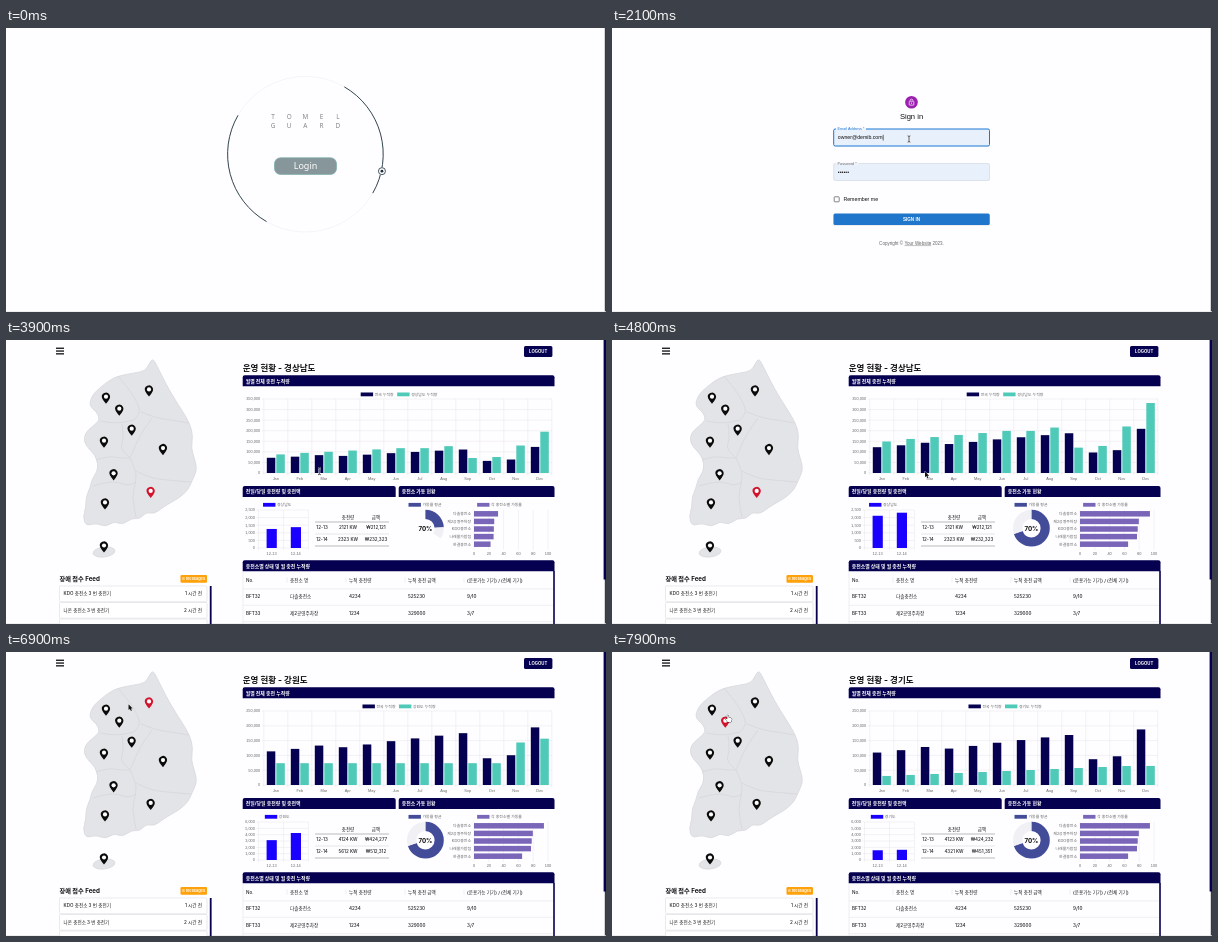
These frames come from a looping animation (600x284 px, 8000 ms). An HTML page with a canvas:

```html
<!DOCTYPE html>
<html lang="ko">
<head>
<meta charset="utf-8">
<title>Charging dashboard</title>
<style>
html, body { margin: 0; width: 100%; height: 100%; overflow: hidden; background: #fefdff; }
canvas { display: block; width: 600px; height: 284px; }
</style>
</head>
<body>
<canvas id="stage"></canvas>
<script>
const W = 600, H = 284, LOOP = 8000, STEP = 100;
const NAVY = '#05004f', TEAL = '#4fc9b8', BLUE = '#1a00ff', INDIGO = '#434c99', VIOLET = '#7a66b9';
const GREY = '#666', INK = '#222', GRID = '#e6e5e9';
const SANS = 'Inter, "Noto Sans CJK KR", "Noto Sans CJK", sans-serif';
const ARIAL = '"Liberation Sans", Arial, "Noto Sans CJK KR", "Noto Sans CJK", sans-serif';

const canvas = document.getElementById('stage');
const ctx = canvas.getContext('2d');
const dpr = window.devicePixelRatio || 1;
canvas.width = W * dpr;
canvas.height = H * dpr;

const clamp = v => Math.max(0, Math.min(1, v));
const lerp = (a, b, p) => a + (b - a) * p;
const easeOut = (t, start) => 1 - Math.pow(1 - clamp((t - start) / 1000), 4);

function rect(x, y, w, h, fill) {
  ctx.fillStyle = fill;
  ctx.fillRect(x, y, w, h);
}

function box(x, y, w, h, r, fill, stroke, width = 1) {
  ctx.beginPath();
  ctx.roundRect(x, y, w, h, r);
  if (fill) { ctx.fillStyle = fill; ctx.fill(); }
  if (stroke) { ctx.strokeStyle = stroke; ctx.lineWidth = width; ctx.stroke(); }
}

function line(x1, y1, x2, y2, color, width = 0.5) {
  ctx.beginPath();
  ctx.moveTo(x1, y1);
  ctx.lineTo(x2, y2);
  ctx.strokeStyle = color;
  ctx.lineWidth = width;
  ctx.stroke();
}

function arc(x, y, r, from, to, color, width) {
  ctx.beginPath();
  ctx.arc(x, y, r, from, to);
  ctx.strokeStyle = color;
  ctx.lineWidth = width;
  ctx.stroke();
}

function disc(x, y, r, fill) {
  ctx.beginPath();
  ctx.arc(x, y, r, 0, Math.PI * 2);
  ctx.fillStyle = fill;
  ctx.fill();
}

function text(s, x, y, size, { color = INK, align = 'left', weight = 500, font = SANS } = {}) {
  ctx.font = `${weight} ${size}px ${font}`;
  ctx.textAlign = align;
  ctx.fillStyle = color;
  ctx.fillText(s, x, y);
}

const label = (s, x, y, align = 'center') =>
  text(s, x, y, 3.9, { color: GREY, align, weight: 400, font: ARIAL });

// ---- Login ----
function drawLogin(t) {
  const cx = 299.4, cy = 126.2, r = 77.8;
  const turn = Math.max(0, t - 100) / 10000 * Math.PI * 2;
  arc(cx, cy, r, 0, Math.PI * 2, '#f4f2f6', 0.8);
  for (const base of [-Math.PI / 3, Math.PI * 2 / 3]) {
    arc(cx, cy, r, base - turn, base - turn + Math.PI / 2, '#34474f', 1);
  }
  const a = 0.218 + turn;
  const dx = cx + Math.cos(a) * 78.4, dy = cy + Math.sin(a) * 78.4;
  disc(dx, dy, 3.9, '#fefdff');
  arc(dx, dy, 3.5, 0, Math.PI * 2, '#34474f', 0.9);
  disc(dx, dy, 1.4, '#1d2d3a');

  ['TOMEL', 'GUARD'].forEach((word, row) => [...word].forEach((ch, i) =>
    text(ch, 267 + i * 16.2, 91 + row * 9.4, 6.4, { color: '#858585', align: 'center', weight: 400, font: '"Noto Sans", sans-serif' })));
  box(268.5, 129.8, 62, 16.6, 6, '#87969a', '#7fb0b0', 0.8);
  text('Login', 299.5, 141.2, 9, { color: '#fff', align: 'center', font: '"Noto Sans", sans-serif' });
}

// ---- Sign in ----
function field(y, name, focused) {
  box(221.7, y, 155.8, 17, 1.5, '#e8f0fc', focused ? '#1976d2' : '#cfd5de', focused ? 1 : 0.6);
  ctx.font = `3.8px ${ARIAL}`;
  rect(224, y - 1, ctx.measureText(name).width + 3, 2, '#f5f7fe');
  text(name, 225.5, y + 1, 3.8, { color: focused ? '#1976d2' : GREY, weight: 400, font: ARIAL });
}

function drawSignIn(t) {
  const focused = t < 3300, plain = { color: '#111', weight: 400, font: ARIAL };
  disc(299.5, 74.2, 6.3, '#9c1fb0');
  box(297.2, 73.2, 4.6, 3.9, 0.5, null, '#fff', 0.7);
  arc(299.5, 72.6, 1.4, Math.PI, 0, '#fff', 0.7);
  disc(299.5, 75.1, 0.6, '#fff');
  text('Sign in', 299.5, 90.8, 7.6, { ...plain, align: 'center' });

  field(101, 'Email Address *', focused);
  text('owner@demib.com', 225.8, 111.4, 5.2, plain);
  if (focused && t % 1000 < 500) line(271.2, 106.8, 271.2, 112.6, '#111', 0.6);
  field(135.5, 'Password *', false);
  text('••••••', 225.8, 145.9, 5.4, plain);

  box(222.2, 168.8, 5, 5, 0.6, null, '#666', 0.8);
  text('Remember me', 231.4, 173.2, 5.25, plain);

  box(221.5, 186.2, 156.2, 11.4, 1.5, 'rgba(0,0,0,.14)');
  box(221.5, 185.5, 156.2, 11.5, 1.5, t >= 2700 ? '#1565c0' : '#2076cb');
  if (t >= 3300) {
    ctx.save();
    ctx.beginPath();
    ctx.rect(221.5, 185.5, 156.2, 11.5);
    ctx.clip();
    disc(306, 191, lerp(10, 100, easeOut(t, 3250)), `rgba(255,255,255,${0.3 * (1 - clamp((t - 3300) / 500))})`);
    ctx.restore();
  }
  text('SIGN IN', 299.5, 193, 4.6, { color: '#fff', align: 'center', weight: 700, font: ARIAL });

  const parts = ['Copyright © ', 'Your Website', ' 2023.'];
  ctx.font = `4.55px ${ARIAL}`;
  const widths = parts.map(p => ctx.measureText(p).width);
  let x = 299.5 - widths.reduce((a, b) => a + b) / 2;
  parts.forEach((p, i) => {
    text(p, x, 216.8, 4.55, { ...plain, color: GREY });
    if (i === 1) line(x, 217.6, x + widths[i], 217.6, GREY, 0.4);
    x += widths[i];
  });
}

// ---- Dashboard data ----
const MONTHS = 'Jan Feb Mar Apr May Jun Jul Aug Sep Oct Nov Dec'.split(' ');
const NATION = [122, 131, 143, 137, 147, 159, 169, 179, 188, 97, 108, 209];
const REGIONS = [
  { name: '경상남도', start: 3700, pin: 8, max: 350, dayMax: 2500, dayStep: 500,
    local: [149, 161, 170, 180, 189, 199, 199, 215, 120, 128, 220, 331],
    days: [['2121 KW', '₩212,121'], ['2323 KW', '₩232,323']] },
  { name: '강원도', start: 6600, pin: 2, max: 250, dayMax: 6000, dayStep: 1000,
    local: MONTHS.map((m, i) => i < 10 ? 97 : 189 + (i - 10) * 17),
    days: [['4124 KW', '₩424,277'], ['5612 KW', '₩512,312']] },
  { name: '서울시', start: 7200, pin: 0, max: 300, dayMax: 6000, dayStep: 1000,
    local: MONTHS.map((m, i) => 120 + 13 * i),
    days: [['4312 KW', '₩431,212'], ['5123 KW', '₩502,123']] },
  { name: '경기도', start: 7790, pin: 1, max: 250, dayMax: 6000, dayStep: 1000,
    local: MONTHS.map((m, i) => Math.min(82 + 9 * i, 173)),
    days: [['4123 KW', '₩424,232'], ['4321 KW', '₩451,351']] }
];
const STATIONS = [['다솔충전소', 94.5], ['제2공영주차장', 79.5], ['KDO충전소', 78], ['나래몰가람점', 77], ['한결충전소', 65]];

// ---- Map ----
const COAST = [147,18, 152,28, 160,44, 168,58, 177,72, 184,84, 187,96, 185,108, 189,120, 191,130, 186,141, 182,150, 173,158,
  164,163, 156,168, 148,174, 140,172, 134,179, 126,178, 116,185, 108,181, 100,187, 90,183, 80,186, 77,177, 80,167, 80,157,
  84,148, 86,139, 91,132, 92,124, 89,115, 83,109, 78,102, 79,93, 87,86, 94,80, 91,72, 83,66, 86,55, 96,46, 104,40,
  112,36, 128,33, 139,31, 143,24];
const BORDERS = [
  [112,36, 122,48, 130,60, 135,72, 128,80],
  [135,72, 150,78, 165,80, 183,83],
  [94,81, 110,84, 128,80],
  [116,84, 118,98, 114,108, 124,118],
  [146,78, 136,92, 130,104, 124,118],
  [90,120, 102,116, 114,118, 124,118],
  [87,146, 106,140, 122,146, 130,142],
  [124,118, 130,130, 130,142, 126,156, 130,177],
  [130,131, 144,138, 160,140, 185,142]
];
const PINS = [[100,58], [113.3,70], [143,50.7], [98,102], [125.7,90], [157,109.4], [107.6,134.6], [99,163.7], [144.7,152.2], [98,206.8]];

function curve(pts, closed) {
  const n = pts.length / 2, at = i => [pts[i % n * 2], pts[i % n * 2 + 1]];
  const mid = (a, b) => [(a[0] + b[0]) / 2, (a[1] + b[1]) / 2];
  ctx.beginPath();
  ctx.moveTo(...(closed ? mid(at(n - 1), at(0)) : at(0)));
  for (let i = closed ? 0 : 1; i < (closed ? n : n - 1); i++) ctx.quadraticCurveTo(...at(i), ...mid(at(i), at(i + 1)));
  if (closed) ctx.closePath(); else ctx.lineTo(...at(n - 1));
}

function pin(x, y, color) {
  ctx.beginPath();
  ctx.arc(x, y - 1.3, 4.1, Math.PI * 0.86, Math.PI * 0.14);
  ctx.quadraticCurveTo(x + 2.6, y + 2.8, x, y + 5.8);
  ctx.quadraticCurveTo(x - 2.6, y + 2.8, x - 3.8, y + 0.5);
  ctx.fillStyle = color;
  ctx.fill();
  disc(x, y - 1.3, 2.1, '#fff');
}

function drawMap(selected) {
  ctx.lineWidth = 0.7;
  ctx.strokeStyle = '#d4d5da';
  ctx.fillStyle = '#e3e4e8';
  curve(COAST, true);
  ctx.fill();
  ctx.stroke();
  for (const b of BORDERS) { curve(b, false); ctx.stroke(); }
  ctx.beginPath();
  ctx.ellipse(98, 212, 11, 5, -0.12, 0, Math.PI * 2);
  ctx.fill();
  ctx.stroke();
  PINS.forEach(([x, y], i) => pin(x, y, i === selected ? '#d3122c' : '#0a0a0a'));
}

// ---- Dashboard panels ----
function header(x, y, w, s) {
  box(x, y, w, 11, [2, 2, 0, 0], NAVY);
  text(s, x + 3, y + 7.4, 4.9, { color: '#fff', weight: 700 });
}

function legend(cx, y, items) {
  const gap = 3.5;
  ctx.font = `400 3.9px ${ARIAL}`;
  const widths = items.map(([s]) => 14 + ctx.measureText(s).width);
  let x = cx - (widths.reduce((a, b) => a + b) + (items.length - 1) * gap) / 2;
  items.forEach(([s, color], i) => {
    rect(x, y - 1.9, 12.4, 3.8, color);
    label(s, x + 14, y + 1.4, 'left');
    x += widths[i] + gap;
  });
}

function yAxis(x1, x2, top, bottom, max, step) {
  for (let v = 0; v <= max; v += step) {
    const y = lerp(bottom, top, v / max);
    line(x1 - 2, y, x2, y, GRID);
    label(v.toLocaleString('en-US'), x1 - 3.6, y + 1.4, 'right');
  }
}

// Shared series keeps its height between regions, so each change starts from the last one.
function nationHeight(k, i, t) {
  if (k < 0) return 0;
  const r = REGIONS[k];
  return lerp(nationHeight(k - 1, i, r.start), NATION[i] / r.max * 74, easeOut(t, r.start));
}

function drawMonthly(k, t) {
  const r = REGIONS[k], p = easeOut(t, r.start), x0 = 257.8, gap = 24;
  legend(393, 54.4, [['전국 누적량', NAVY], [r.name + ' 누적량', TEAL]]);
  yAxis(x0, 546, 59, 133, r.max * 1000, 50000);
  for (let i = 0; i <= 12; i++) line(x0 + i * gap, 59, x0 + i * gap, 135, GRID);
  MONTHS.forEach((m, i) => {
    const cx = x0 + (i + 0.5) * gap;
    const a = nationHeight(k, i, t), b = r.local[i] / r.max * 74 * p;
    rect(cx - 9, 133 - a, 8.5, a, NAVY);
    rect(cx + 0.5, 133 - b, 8.5, b, TEAL);
    label(m, cx, 140.4);
  });
}

function drawDaily(k, t) {
  const r = REGIONS[k], p = easeOut(t, r.start);
  legend(271.2, 164.8, [[r.name, BLUE]]);
  yAxis(252.5, 302, 170, 208, r.dayMax, r.dayStep);
  for (let i = 0; i < 3; i++) line(252.5 + i * 25, 170, 252.5 + i * 25, 210, GRID);
  const mid = { align: 'center' };
  text('충전량', 342, 178.8, 4.5, mid);
  text('금액', 370, 178.8, 4.5, mid);
  line(309, 182, 383, 182, '#777');
  r.days.forEach(([power, cost], i) => {
    const day = '12-1' + (3 + i), h = parseInt(power) / r.dayMax * 38 * p, y = 189.4 + i * 11.3;
    rect(260.6 + i * 24.2, 208 - h, 10.2, h, BLUE);
    label(day, 265.6 + i * 24.2, 214.8);
    text(day, 316, y, 4.5, mid);
    text(power, 342, y, 4.5, mid);
    text(cost, 370, y, 4.5, mid);
    line(309, 194 + i * 12, 383, 194 + i * 12, i ? '#777' : '#ccc');
  });
}

function drawUptime(t) {
  const p = easeOut(t, 3800), top = -Math.PI / 2, full = Math.PI * 2 * p;
  legend(419, 164.8, [['가동률 평균', INDIGO]]);
  arc(419.4, 188.2, 13.8, top, top + full * 0.7, INDIGO, 9.2);
  arc(419.4, 188.2, 13.8, top + full * 0.7, top + full, '#f0f0f5', 9.2);
  text('70%', 419.4, 190.5, 6.2, { align: 'center', weight: 700, color: '#111' });

  legend(493.5, 164.8, [['각 충전소별 가동률', VIOLET]]);
  for (let v = 0; v <= 100; v += 20) {
    const x = 468 + v * 0.74;
    line(x, 170, x, 210, GRID);
    label(v, x, 214.6);
  }
  STATIONS.forEach(([name, value], i) => {
    const y = 173.8 + i * 7.6;
    rect(468, y - 2.75, value * 0.74 * p, 5.5, VIOLET);
    label(name, 465, y + 1.4, 'right');
  });
}

function drawTable() {
  const cols = [240, 284, 343, 402, 461];
  const rows = [
    ['No.', '충전소 명', '누적 충전량', '누적 충전 금액', '(운용가능 기기) / (전체 기기)'],
    ['BFT32', '다솔충전소', '4234', '525230', '9/10'],
    ['BFT33', '제2공영주차장', '1234', '329000', '3/7']
  ];
  rows.forEach((row, i) => {
    const y = 241.9 + i * 16.4;
    row.forEach((s, c) => text(s, cols[c], y, 4.6));
    line(237, y + 7, 547, y + 7, '#dddce0');
  });
  cols.slice(1).forEach(x => line(x - 3, 237.5, x - 3, 242.5, '#dddce0'));
  line(237, 231, 237, H, '#dddce0');
  rect(547.2, 231, 1.6, 53, NAVY);
}

function drawFeed() {
  text('장애 접수 Feed', 53.5, 241.2, 6.2, { weight: 700, color: '#111' });
  box(174.5, 235, 26.5, 7.8, 1.2, '#ffa10a');
  text('6 messages', 187.7, 240.4, 3.9, { color: '#fff', align: 'center', weight: 600 });
  [['KDO 충전소 3 번 충전기', '1 시간 전'], ['나온 충전소 3 번 충전기', '2 시간 전'], ['', '']].forEach(([s, ago], i) => {
    const y = 246 + i * 16.5;
    box(53.5, y, 147.5, 15.7, 1, '#fff', '#dcdbe0', 0.6);
    text(s, 57.5, y + 9, 4.6);
    text(ago, 196, y + 9, 4.6, { align: 'right' });
  });
  rect(203.8, 246, 1.8, 38, NAVY);
}

function drawDashboard(t) {
  const k = REGIONS.findLastIndex(r => t >= r.start);
  for (let i = 0; i < 3; i++) rect(50, 7.6 + i * 2.8, 8, 1.3, '#111');
  box(518, 6, 28.4, 11, 1.5, NAVY);
  text('LOGOUT', 532.2, 13.2, 4.3, { color: '#fff', align: 'center', weight: 700 });
  text('운영 현황 - ' + REGIONS[k].name, 236.8, 31, 8.5, { weight: 700, color: '#111' });
  drawMap(REGIONS[k].pin);
  header(236.7, 35.2, 311.8, '월별 전체 충전 누적량');
  header(236.7, 146, 153, '전일/당일 충전량 및 충전액');
  header(392.7, 146, 155.8, '충전소 가동 현황');
  header(236.7, 220.2, 311.8, '충전소별 상태 및 월 충전 누적량');
  drawMonthly(k, t);
  drawDaily(k, t);
  drawUptime(t);
  drawTable();
  drawFeed();
}

// ---- Pointer ----
const PATH = [
  [500, 345, 172, 'arrow'], [900, 310.5, 138.5, 'hand'], [1400, 310.5, 138.5, 'arrow'], [1900, 297, 111, 'beam'],
  [2100, 297, 111, 'beam'], [2300, 298, 122, 'arrow'], [2700, 306, 189, 'hand'], [3300, 306, 189, 'hand'],
  [3500, 310, 160, 'beam'], [3700, 313.5, 131.5, 'beam'], [4700, 313, 131.5, 'arrow'], [4800, 313, 131.5, 'arrow'],
  [5000, 150, 120, 'arrow'], [5300, 150, 120, 'arrow'], [6100, 142.5, 50, 'hand'], [6600, 142.5, 50, 'arrow'],
  [6900, 122.5, 52.3, 'arrow'], [7200, 100, 57, 'hand'], [7400, 100, 57, 'hand'], [7800, 115.3, 63, 'hand'], [LOOP, 115.3, 63, 'hand']
];
const SHAPES = {
  arrow: new Path2D('M0 0V5.8L1.4 4.6L2.4 6.7L3.4 6.2L2.4 4.2H4.2Z'),
  hand: new Path2D('M0 .5Q.6-.4 1.2.5V2.6L3.8 3.2Q4.6 3.5 4.4 4.6L3.8 7H.4L-1.6 4.4Q-1.4 3.4 0 4.2Z'),
  beam: new Path2D('M-1.4-3.2Q0-3.2 0-2.4Q0-3.2 1.4-3.2M0-2.4V2.4M-1.4 3.2Q0 3.2 0 2.4Q0 3.2 1.4 3.2')
};

function outline(shape, color, width) {
  ctx.strokeStyle = color;
  ctx.lineWidth = width;
  ctx.stroke(shape);
}

function drawPointer(t) {
  const i = PATH.findLastIndex(key => t >= key[0]);
  if (i < 0) return;
  const a = PATH[i], b = PATH[Math.min(i + 1, PATH.length - 1)];
  const p = clamp((t - a[0]) / (b[0] - a[0] || 1)), kind = a[3], shape = SHAPES[kind];
  ctx.save();
  ctx.translate(lerp(a[1], b[1], p), lerp(a[2], b[2], p));
  if (kind === 'beam') {
    outline(shape, '#fff', 1.8);
    outline(shape, '#111', 0.7);
  } else {
    outline(shape, kind === 'hand' ? '#111' : '#fff', 0.7);
    ctx.fillStyle = kind === 'hand' ? '#fff' : '#111';
    ctx.fill(shape);
  }
  ctx.restore();
}

function draw(now) {
  const t = Math.floor(now % LOOP / STEP) * STEP;
  ctx.setTransform(dpr, 0, 0, dpr, 0, 0);
  rect(0, 0, W, H, '#fefdff');
  rect(598.8, 0, 1.2, H, '#3a3a3e');
  rect(0, 283.3, W, 0.7, '#e9e8ea');
  if (t < 1400) drawLogin(t);
  else if (t < 3900) drawSignIn(t);
  else {
    drawDashboard(t);
    rect(597.6, 0, 2.4, 239.5, NAVY);
  }
  drawPointer(t);
}

const begin = performance.now();
function tick() {
  draw(performance.now() - begin);
  requestAnimationFrame(tick);
}
tick();
</script>
</body>
</html>
```
